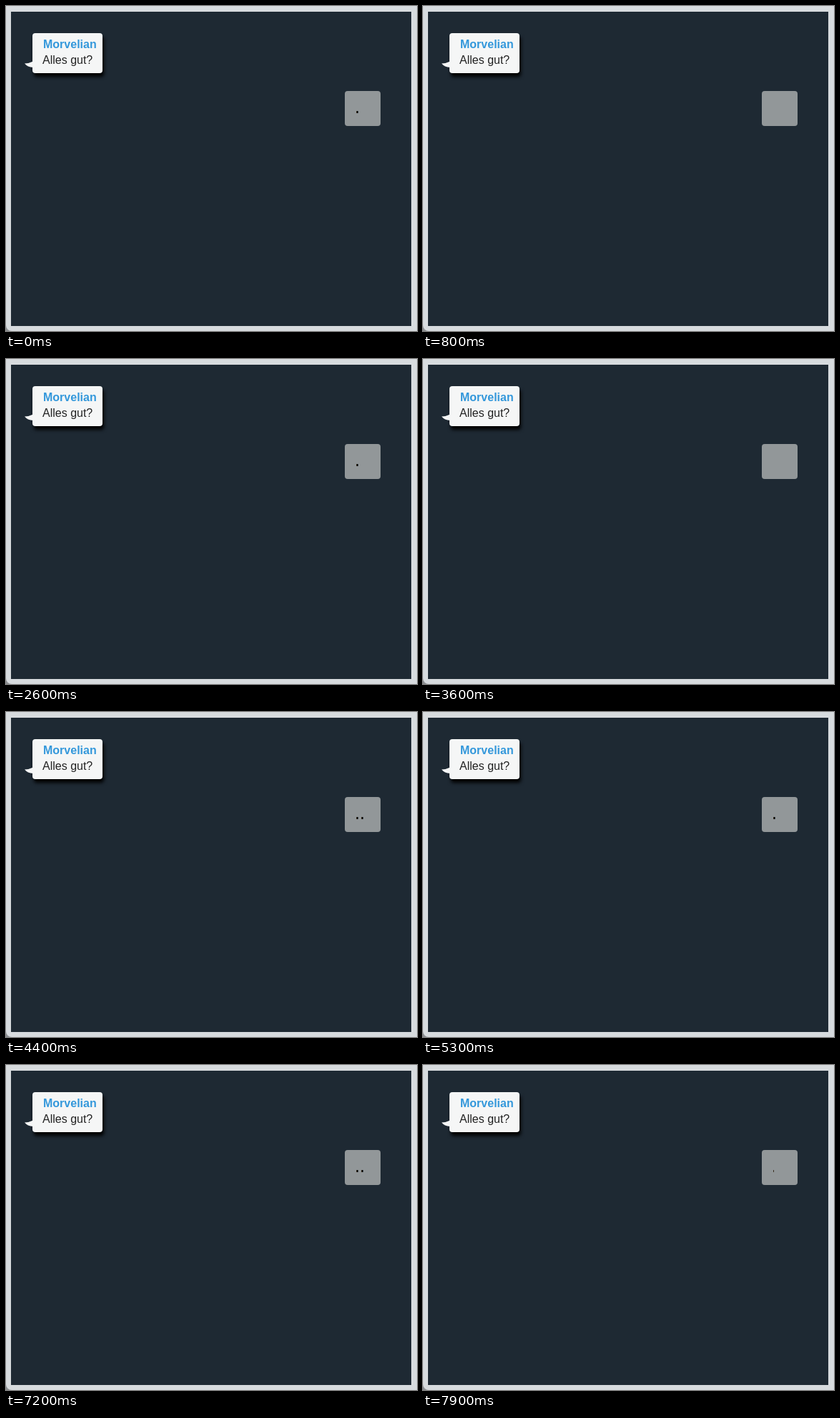
Write an HTML page that moves like this. It is 575 px wide and 455 px high and loops after 8 s.

```html
<!DOCTYPE html>
<html lang="de">
<head>
<meta charset="utf-8">
<title>Chat</title>
<style>
  html, body { margin: 0; width: 100%; height: 100%; overflow: hidden; background: #8b8e91; }
  body { font: 16px/22px "Liberation Sans", Arial, sans-serif; }
  body * { position: absolute; box-sizing: border-box; }
  .frame { left: 0; top: 0; width: 575px; height: 455px; background: #d7dbde; border-radius: 0 0 0 8px; }
  .chat { left: 7px; top: 8px; width: 560px; height: 440px; background: #1e2933; }
  .bubble {
    left: 37px; top: 38px; width: 98px; height: 56px;
    background: #f5f6f6; border-radius: 4px; box-shadow: 2px 5px 5px #000;
  }
  .bubble span { white-space: nowrap; }
  .name { left: 15px; top: 5px; font-weight: bold; color: #3498db; }
  .text { left: 14px; top: 27px; color: #222; }
  .tail { left: 0; top: 0; }
  .typing { left: 474px; top: 119px; width: 50px; height: 49px; background: #929799; border-radius: 4px; }
  .dot {
    top: 28px; height: 3px; width: 0;
    background: linear-gradient(90deg, #3b3022 1px, #000 1px 2px, #30383e 2px) 0 0 / 3px 3px no-repeat;
  }
</style>
</head>
<body>
<div class="frame"></div>
<div class="chat"></div>
<div class="bubble">
  <span class="name">Morvelian</span>
  <span class="text">Alles gut?</span>
</div>
<svg class="tail" width="60" height="100">
  <path d="M26 80.5Q32 80.5 38 77.5V86Q30 85.5 26 80.5Z" fill="#f5f6f6"/>
</svg>
<div class="typing">
  <i class="dot" style="left:16px"></i>
  <i class="dot" style="left:23px"></i>
  <i class="dot" style="left:30px"></i>
</div>
<script>
  const LOOP = 8000, CYCLE = 1375, OFFSET = 615;
  const FIRST = 202, DOT_GAP = 463, PIXEL_STEP = 88;
  const dots = document.querySelectorAll('.dot');
  const start = performance.now();

  // Each dot is uncovered from the left, one pixel column at a time.
  function draw(now) {
    const time = Math.max(0, now - start) % LOOP;
    const phase = (time + OFFSET) % CYCLE;
    dots.forEach((dot, i) => {
      const columns = Math.floor((phase - FIRST - i * DOT_GAP) / PIXEL_STEP) + 1;
      dot.style.width = Math.max(0, Math.min(3, columns)) + 'px';
    });
    requestAnimationFrame(draw);
  }
  draw(start);
</script>
</body>
</html>
```
